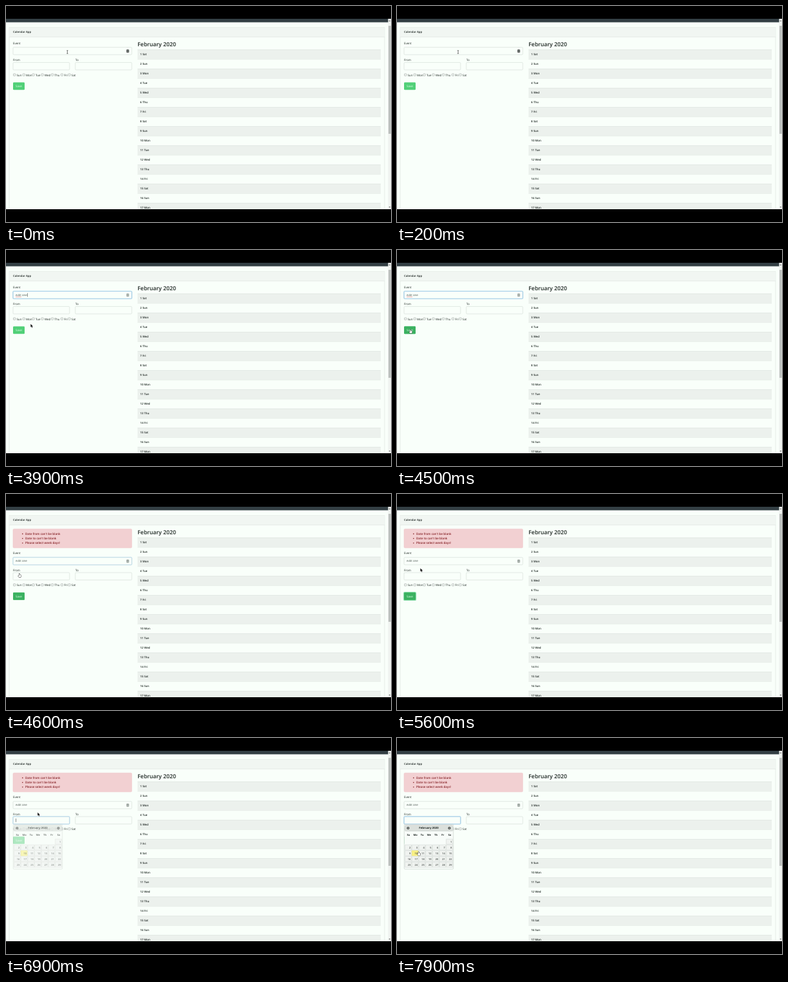
Write an HTML page with a canvas that moves like this. It is 600 px wide and 338 px high and loops after 8 s.

```html
<!DOCTYPE html>
<html lang="en">
<head>
<meta charset="utf-8">
<title>Calendar App</title>
<style>
html, body { margin: 0; width: 600px; height: 338px; overflow: hidden; background: #000; }
canvas { display: block; }
</style>
</head>
<body>
<canvas id="stage" width="600" height="338"></canvas>
<script>
const ctx = document.getElementById('stage').getContext('2d');
const LOOP = 8000, STEP = 100;
const TOP = 20, BOTTOM = 318;
const DAYS = ['Sun', 'Mon', 'Tue', 'Wed', 'Thu', 'Fri', 'Sat'];
const DAY_X = [11.2, 25.8, 40.7, 54.7, 70.3, 85.3, 96.8];
const PAGE = '#f9fffa', LINE = '#d9e0db', INK = '#1e2623';
const BLUE = '#8cc3ee', RING = '#3490dc';

// Pointer path: time, x, y, shape
const POINTER = [
  [0, 95.7, 72, 'beam'], [200, 95.1, 72, 'beam'], [3600, 95.1, 72, 'beam'],
  [3900, 38.4, 115.8, 'arrow'], [4200, 21, 124.5, 'hand'], [5000, 21, 124.5, 'hand'],
  [5300, 33, 118, 'arrow'], [5400, 33, 118, 'arrow'], [5600, 36.4, 116.2, 'arrow'],
  [5800, 49, 105, 'beam'], [6700, 49, 105, 'beam'], [6900, 49.3, 116.6, 'arrow'],
  [7200, 42, 150, 'hand'], [7600, 33.8, 178, 'hand'], [8000, 33.8, 178, 'hand']
];

const clamp = v => Math.max(0, Math.min(1, v));
const ramp = (t, a, b) => clamp((t - a) / (b - a));
const pulse = (t, a, b, c, d) => ramp(t, a, b) - ramp(t, c, d);
const within = (t, a, b) => t >= a && t < b;

function rect(x, y, w, h, fill, stroke, r = 0, lineWidth = 0.6) {
  ctx.beginPath();
  ctx.roundRect(x, y, w, h, r);
  if (fill) { ctx.fillStyle = fill; ctx.fill(); }
  if (stroke) { ctx.strokeStyle = stroke; ctx.lineWidth = lineWidth; ctx.stroke(); }
}

function text(str, x, y, { size = 4.5, weight = 400, color = INK, align = 'left' } = {}) {
  ctx.font = `${weight} ${size}px "Open Sans", sans-serif`;
  ctx.fillStyle = color;
  ctx.textAlign = align;
  ctx.fillText(str, x, y + size * 0.34);
}

function dot(x, y, r, color) {
  ctx.fillStyle = color;
  ctx.beginPath();
  ctx.arc(x, y, r, 0, 7);
  ctx.fill();
}

function poly(points, fill, stroke, lineWidth = 0.6) {
  ctx.beginPath();
  points.forEach(([x, y]) => ctx.lineTo(x, y));
  ctx.closePath();
  ctx.lineWidth = lineWidth;
  ctx.strokeStyle = stroke;
  ctx.stroke();
  ctx.fillStyle = fill;
  ctx.fill();
}

function faded(alpha, draw) {
  if (alpha <= 0) return;
  ctx.save();
  ctx.globalAlpha *= alpha;
  draw();
  ctx.restore();
}

function field(x, y, w, focus) {
  faded(focus * 0.2, () => rect(x, y, w, 11.6, null, RING, 1.3, 1.8));
  rect(x, y, w, 11.6, PAGE, '#d0d8d3', 1.2);
  faded(focus, () => rect(x, y, w, 11.6, null, BLUE, 1.2, 0.7));
}

function caret(x, y) {
  rect(x, y - 2.8, 0.5, 5.6, '#222');
}

function drawPage() {
  rect(0, TOP, 600, BOTTOM - TOP, PAGE);
  rect(0, TOP, 596, 5.4, '#333f44');
  rect(5, 33.5, 585, 300, PAGE, LINE);
  rect(5.3, 33.8, 584.4, 14.6, '#f1f6f2');
  rect(5, 48.2, 585, 0.5, LINE);
  text('Calendar App', 11, 41, { size: 4.35, weight: 600 });

  text('February 2020', 205, 59.6, { size: 8.7, weight: 600 });
  for (let day = 1; day <= 17; day++) {
    const y = 53 + day * 15;
    if (day % 2) rect(205, y, 379, 15, '#ecf1ed');
    rect(205, y, 379, 0.5, '#dbe1dd');
    text(`${day} ${DAYS[(day + 5) % 7]}`, 209, y + 7.6, { size: 4.4, weight: 600 });
  }

  rect(595.5, TOP, 4.5, BOTTOM - TOP, '#f0f3f0');
  rect(596, 31, 3.7, 169, '#bdc1be');
  poly([[596.7, 24], [597.8, 22.5], [598.9, 24]], '#555', '#555', 0.1);
  poly([[596.7, 314], [597.8, 315.5], [598.9, 314]], '#555', '#555', 0.1);
}

function drawErrors() {
  rect(11, 54.8, 185, 29.4, '#f2d0d2', '#efc6c9', 1.2);
  ["Date from can't be blank", "Date to can't be blank", 'Please select week days!'].forEach((line, i) => {
    const y = 62.2 + i * 7.2;
    dot(25.8, y + 0.2, 0.8, '#851f24');
    text(line, 30, y, { size: 4.6, weight: 600, color: '#851f24' });
  });
}

function drawForm(t) {
  const failed = t >= 4600;
  if (failed) drawErrors();
  ctx.save();
  ctx.translate(0, failed ? 34.6 : 0);

  const eventFocus = pulse(t, 2500, 2800, 4500, 4700) + pulse(t, 5900, 6200, 6600, 6900);
  text('Event', 11, 58.2);
  field(11, 64.6, 185, eventFocus);
  if (t >= 2500) text('evbt one', 15, 70.4, { size: 4.4, color: '#454e4a' });
  if (within(t, 3500, 4600)) {
    ctx.beginPath();
    for (let i = 0; i <= 9; i++) ctx.lineTo(15 + i, 73 + (i % 2) * 0.6);
    ctx.strokeStyle = '#e0555a';
    ctx.lineWidth = 0.5;
    ctx.stroke();
  }
  if (within(t, 2500, 3100) || within(t, 3700, 4200) || within(t, 6100, 6600)) caret(33, 70.4);

  const iconColor = t < 2600 ? '#2c3230' : '#8f9792';
  rect(187.8, 68.2, 3.8, 4.6, iconColor, null, 0.6);
  for (let i = 0; i < 3; i++) rect(188.7, 69.3 + i, 2, 0.45, '#e3e9e5');

  text('From', 11, 84.5);
  text('To', 108, 84.5);
  field(11, 88.4, 88, ramp(t, 6700, 7000));
  field(108, 88.4, 88, 0);
  if (within(t, 6800, 7400)) caret(15.3, 94.2);

  DAYS.forEach((day, i) => {
    rect(DAY_X[i] + 0.3, 106, 3.3, 3.3, '#f3f7f4', '#8c9590', 0.5, 0.5);
    text(day, DAY_X[i] + 5.2, 108.1);
  });

  const buttonFocus = pulse(t, 4600, 4700, 5900, 6200);
  const pressed = pulse(t, 4000, 4200, 5900, 6200);
  faded(buttonFocus * 0.5, () => rect(11, 119.6, 18, 11.6, null, '#38c172', 1.4, 2.4));
  rect(11, 119.6, 18, 11.6, '#51d077', null, 1.2);
  faded(pressed, () => rect(11, 119.6, 18, 11.6, '#3bb160', null, 1.2));
  text('Save', 20, 125.4, { color: '#e9fff0', align: 'center' });
  ctx.restore();
}

function drawPicker() {
  rect(11.2, 135.2, 76.6, 70, '#f8fcf9', '#b9c0bb', 1.2, 0.5);
  rect(12.4, 136.4, 74.2, 9.2, '#dbe0dc', '#bcc2be', 1.2, 0.5);
  text('February 2020', 49.5, 141, { size: 4.3, weight: 700, align: 'center' });
  [[17.3, -1], [81.6, 1]].forEach(([x, dir]) => {
    dot(x, 141, 2.1, '#3d4340');
    poly([[x - dir * 0.5, 140], [x + dir * 0.8, 141], [x - dir * 0.5, 142]], '#fff', '#fff', 0.1);
  });
  DAYS.forEach((day, i) =>
    text(day.slice(0, 2), 17.8 + i * 10.7, 152, { size: 4, weight: 700, align: 'center' }));
  for (let day = 1; day <= 29; day++) {
    const cell = day + 5;
    const x = 12.5 + (cell % 7) * 10.7, y = 158.2 + Math.floor(cell / 7) * 9;
    const today = day === 10;
    rect(x, y, 10, 8.1, today ? '#f8f083' : '#f0f3f0', today ? '#e5d96a' : '#cbd0cc', 0, 0.5);
    text(day, x + 8.9, y + 4.1, { size: 4, weight: 600, color: '#4a504d', align: 'right' });
  }
}

const SHAPES = {
  beam() {
    rect(-0.3, -2.7, 0.7, 5.4, '#333');
    rect(-1.3, -3, 2.6, 0.5, '#555');
    rect(-1.3, 2.5, 2.6, 0.5, '#555');
  },
  arrow() {
    poly([[0, 0], [0, 5], [1.2, 4], [2.1, 6], [3, 5.6], [2.1, 3.7], [3.7, 3.6]], '#111', '#fff');
  },
  hand() {
    poly([[-0.6, 0], [0.3, 0], [0.5, 2], [2.5, 2.5], [2.7, 4], [2, 5.8], [-0.7, 5.8], [-2.2, 3.5], [-1.6, 3], [-0.6, 3.8]],
      '#fff', '#222', 0.9);
  }
};

function drawPointer(t) {
  const next = Math.max(1, POINTER.findIndex(key => key[0] > t));
  const [t0, x0, y0, shape] = POINTER[next - 1];
  const [t1, x1, y1] = POINTER[next];
  const k = t < 200 ? 0 : ramp(t, t0, t1);
  ctx.save();
  ctx.translate(x0 + (x1 - x0) * k, y0 + (y1 - y0) * k);
  SHAPES[shape]();
  ctx.restore();
}

function draw(now) {
  const t = Math.floor((now % LOOP) / STEP) * STEP;
  ctx.textRendering = 'geometricPrecision';
  drawPage();
  drawForm(t);
  faded(ramp(t, 6700, 7060), drawPicker);
  drawPointer(t);
  rect(0, 0, 600, TOP, '#000');
  rect(0, BOTTOM, 600, 338 - BOTTOM, '#000');
}

const start = performance.now();
function tick() {
  draw(performance.now() - start);
  requestAnimationFrame(tick);
}
tick();
</script>
</body>
</html>
```
